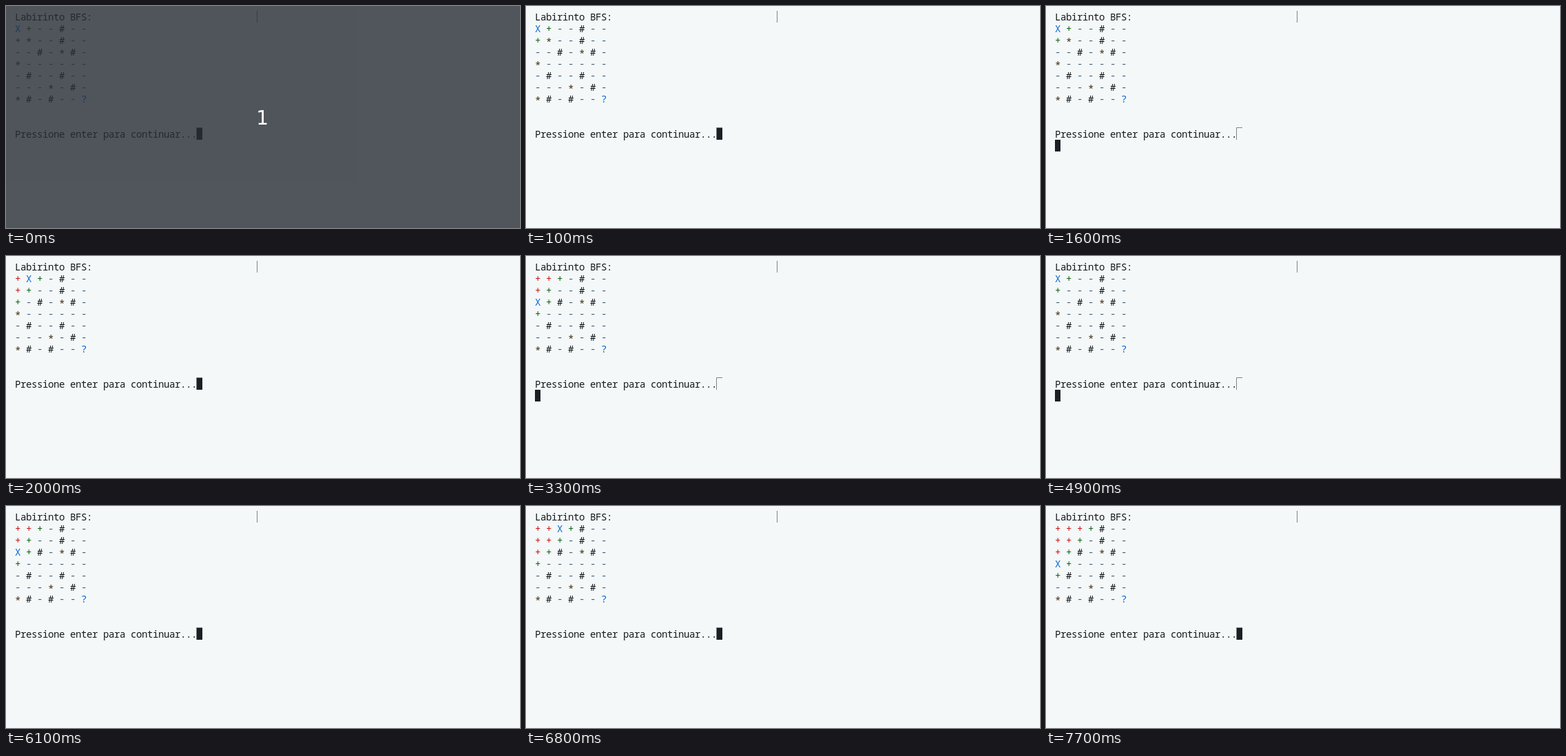
Write an HTML page that moves like this. It is 746 px wide and 322 px high and loops after 8 s.

```html
<!DOCTYPE html>
<html lang="pt">
<head>
<meta charset="utf-8">
<title>Labirinto BFS</title>
<style>
html, body { margin: 0; width: 100%; height: 100%; overflow: hidden; background: #f4f8f9; }
svg { display: block; }
text { font: 500 14px "Noto Sans Mono", "DejaVu Sans Mono", monospace; letter-spacing: -.4px; fill: #14181c; white-space: pre; }
#count { font: 28px "DejaVu Sans", sans-serif; letter-spacing: 0; fill: #fff; text-anchor: middle; }
</style>
</head>
<body>
<svg width="746" height="322" viewBox="0 0 746 322">
  <rect width="746" height="322" fill="#f4f8f9"/>
  <text x="13" y="21">Labirinto BFS:</text>
  <path d="M364.5 7V24M276.5 194V176.5H285" fill="none" stroke="#808589"/>
  <g id="maze"></g>
  <text x="13" y="191">Pressione enter para continuar...</text>
  <rect id="cursor" width="8" height="17" fill="#1b1f23"/>
  <g id="intro">
    <rect width="746" height="322" fill="#272e34" fill-opacity=".8"/>
    <text id="count" x="372.2" y="172">1</text>
  </g>
</svg>
<script>
const LOOP = 8000, INTRO = 100;
const MAP = [
  "----#--",
  "-*--#--",
  "--#-*#-",
  "*------",
  "-#--#--",
  "---*-#-",
  "*#-#--?"
];
const INK = {
  X: "#0366d6", "?": "#0366d6", seen: "#c81010", queued: "#0a600a",
  "*": "#3c2a0a", "-": "#456078", "#": "#0c1116"
};

// Enter key presses; the maze redraws a moment after each
const PRESSES = [1600, 1900, 2800, 3300, 3700, 4900, 5200, 5900, 6300, 6700, 7600];
const QUICK = [1900, 6700, 7600];
const redrawAt = press => press + (QUICK.includes(press) ? 100 : 200);

const $ = id => document.getElementById(id);
const cells = MAP.map((line, r) => [...line].map((_, c) => {
  const el = document.createElementNS("http://www.w3.org/2000/svg", "text");
  el.setAttribute("x", 13 + 16 * c);
  $("maze").append(el);
  return el;
}));

// Breadth-first search up to node number `step`, where the agent stands
function search(map, step) {
  const state = map.map(line => line.map(() => ""));
  const queue = [[0, 0]];
  for (let i = 0; i <= step; i++) {
    const [r, c] = queue[i];
    state[r][c] = i < step ? "seen" : "X";
    for (const [y, x] of [[r + 1, c], [r, c + 1], [r - 1, c], [r, c - 1]]) {
      if ((map[y]?.[x] ?? "#") === "#" || state[y][x]) continue;
      state[y][x] = "queued";
      queue.push([y, x]);
    }
  }
  return { state, agent: queue[step] };
}

// Each press advances the search; a trap is used up and sends the agent back
function mazeAfter(moves) {
  const map = MAP.map(line => [...line]);
  let step = 0;
  while (moves-- > 0) {
    const [r, c] = search(map, step).agent;
    if (map[r][c] === "*") {
      map[r][c] = "-";
      step = 0;
    } else step++;
  }
  return { map, state: search(map, step).state };
}

function drawMaze(moves) {
  const { map, state } = mazeAfter(moves);
  cells.forEach((line, r) => line.forEach((el, c) => {
    const mark = state[r][c];
    const ch = mark === "X" ? "X" : mark ? "+" : map[r][c];
    el.textContent = ch;
    el.style.fill = INK[mark || ch];
    el.setAttribute("y", 38 + 17 * r + (ch === "*" ? 2 : 0));
  }));
}

let drawn = -1;

function render(t) {
  const pressed = PRESSES.filter(p => p <= t).length;
  const moves = PRESSES.filter(p => redrawAt(p) <= t).length;
  if (moves !== drawn) drawMaze(drawn = moves);
  const newLine = pressed > moves;
  $("cursor").setAttribute("x", newLine ? 13 : 277);
  $("cursor").setAttribute("y", newLine ? 194 : 177);
  $("intro").setAttribute("visibility", t < INTRO ? "visible" : "hidden");
}

const start = performance.now();
function tick() {
  render((performance.now() - start) % LOOP);
  requestAnimationFrame(tick);
}
tick();
</script>
</body>
</html>
```
